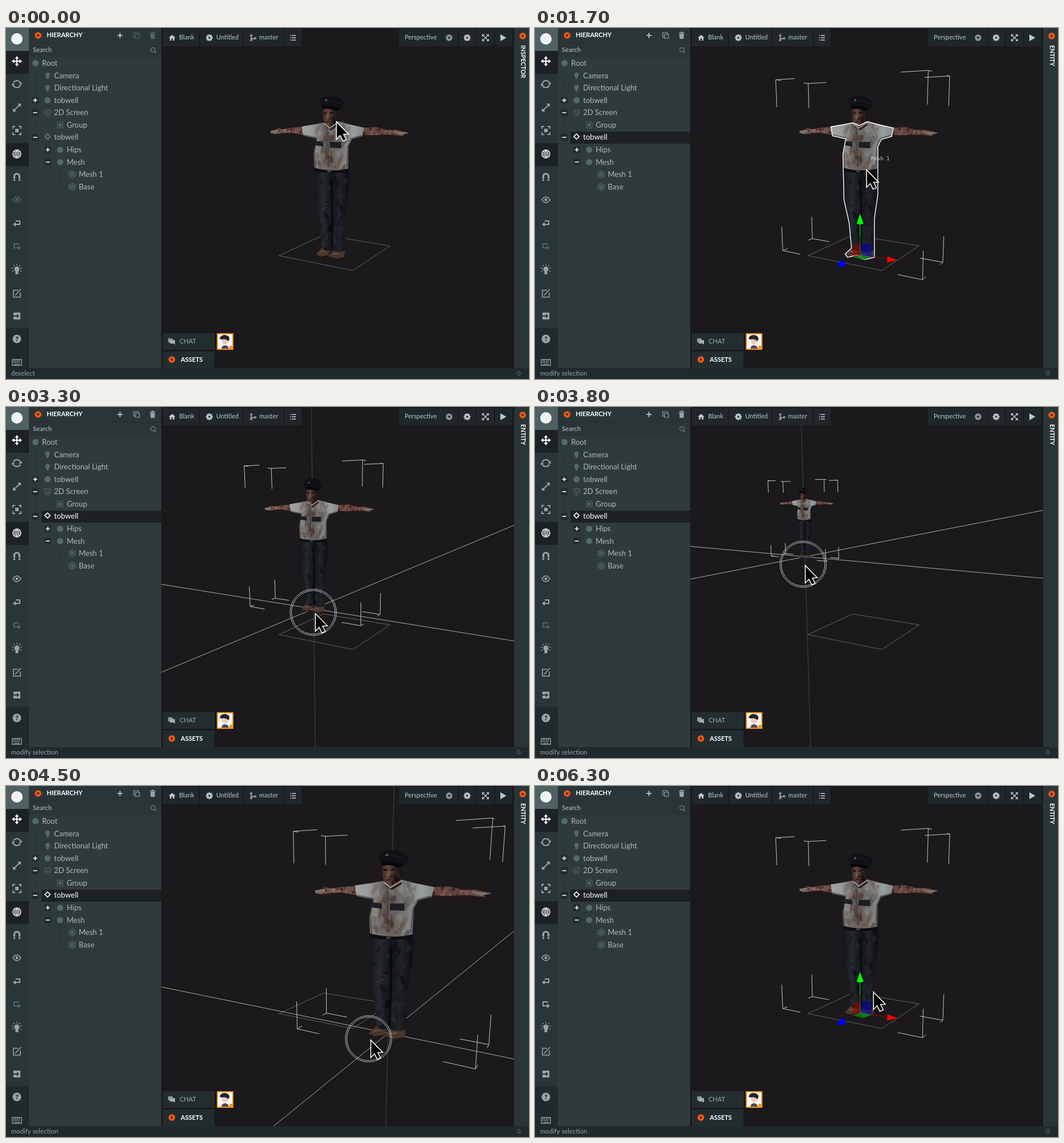
Animation, 913 px wide and 613 px high, one loop 6400 ms. Source, as an HTML page with a canvas:

```html
<!DOCTYPE html>
<html lang="en">
<head>
<meta charset="utf-8">
<title>Scene editor</title>
<style>
html, body { margin: 0; width: 100%; height: 100%; overflow: hidden; background: #1b191c; }
canvas { display: block; }
</style>
</head>
<body>
<canvas id="stage" width="913" height="613"></canvas>
<script>
const ctx = document.getElementById('stage').getContext('2d');
const LOOP = 6400, STEP = 100;
const SANS = 'Lato, "Open Sans", sans-serif';
const TEXT = '#b1b8ba', DIM = '#536568', WHITE = '#fff', ORANGE = '#ff5a0a', DARK = '#1b2124';

// ---------- drawing helpers ----------
function rect(x, y, w, h, color) { ctx.fillStyle = color; ctx.fillRect(x, y, w, h); }
function disc(x, y, r, color) {
  ctx.fillStyle = color;
  ctx.beginPath(); ctx.arc(x, y, r, 0, Math.PI * 2); ctx.fill();
}
function ring(x, y, r, color, width = 1) {
  ctx.strokeStyle = color; ctx.lineWidth = width;
  ctx.beginPath(); ctx.arc(x, y, r, 0, Math.PI * 2); ctx.stroke();
}
function line(a, b, color, width = 1) {
  ctx.strokeStyle = color; ctx.lineWidth = width;
  ctx.beginPath(); ctx.moveTo(...a); ctx.lineTo(...b); ctx.stroke();
}
function fill(d, color) { ctx.fillStyle = color; ctx.fill(new Path2D(d)); }
function stroke(d, color, width = 1) { ctx.strokeStyle = color; ctx.lineWidth = width; ctx.stroke(new Path2D(d)); }
function label(text, x, y, color, font) {
  ctx.font = font + ' ' + SANS; ctx.fillStyle = color; ctx.textBaseline = 'middle';
  ctx.fillText(text, x, y + 0.5);
}
function at(x, y, draw) { ctx.save(); ctx.translate(x, y); draw(); ctx.restore(); }

// ---------- camera: 45 degree lens, pitched down, turned against the world axes ----------
const CX = 579, CY = 297, FOCAL = 717, HORIZON = 157;
const PITCH = Math.atan((CY - HORIZON) / FOCAL), SIN = Math.sin(PITCH), COS = Math.cos(PITCH);
const YAW = 30.2 * Math.PI / 180, YS = Math.sin(YAW), YC = Math.cos(YAW);
const VANISH = [
  [CX - FOCAL / COS / Math.tan(YAW), HORIZON],
  [CX + FOCAL / COS * Math.tan(YAW), HORIZON],
  [CX, CY + FOCAL * COS / SIN]
];
function groundAt([x, y]) {
  const k = (y - CY) / FOCAL;
  const f = (COS - k * SIN) / (SIN + k * COS);
  return { r: (x - CX) / FOCAL * (f * COS + SIN), f };
}
function project(o, a, b, u) {
  const r = o.r - YC * a + YS * b, f = o.f + YS * a + YC * b, w = u - 1;
  const depth = f * COS - w * SIN;
  return [CX + FOCAL * r / depth, CY - FOCAL * (f * SIN + w * COS) / depth];
}
const HOME = [567, 394];

// ---------- timeline ----------
const SELECT = 200, SELECT_ROOT = 1700, DRAG = 3000, RELEASE = 5100, UNDO = 5800;
const CURSOR = [[900, 576, 162], [1400, 578, 246], [1900, 578, 246], [2400, 575, 364], [2600, 575, 364],
  [2900, 571, 398], [3000, 571, 398], [3800, 471, 275], [4500, 636, 442], [4900, 590, 358]];
const ORIGIN = [[3000, 567, 394], [3800, 471, 261], [4500, 666.4, 431.3], [4900, 581, 358]];
function track(keys, t) {
  if (t <= keys[0][0]) return keys[0].slice(1);
  for (let i = 1; i < keys.length; i++) {
    const [t0, x0, y0] = keys[i - 1], [t1, x1, y1] = keys[i];
    if (t < t1) {
      const p = (t - t0) / (t1 - t0), e = p * p * (3 - 2 * p);
      return [x0 + (x1 - x0) * e, y0 + (y1 - y0) * e];
    }
  }
  return keys[keys.length - 1].slice(1);
}

// ---------- figure ----------
const SHIRT = 'M516 172 L540 168 L555 165 L565 170 L580 163 L598 168 L625 174 L622 189 L604 194 L598 207 L597 246 Q570 254 539 246 L537 220 L542 193 L519 188 Z';
const PANTS = 'M539 247 Q570 254 597 248 L597 290 L592 332 L592 389 Q582 393 572 389 L570 330 L568 388 Q558 391 552 385 L548 340 L541 305 Z';
const ARM_L = 'M518 173 L500 174 L482 177 L474 174 L471 178 L461 180 L469 182 L464 185 L478 185 L497 183 L518 187 Z';
const ARM_R = 'M624 174 L646 173 L665 178 L682 178 L704 183 L690 184 L696 189 L678 187 L660 187 L640 188 L624 187 Z';
const FACE = 'M553 139 L580 140 L580 154 L576 166 L568 174 L559 170 L554 160 Z';
const HEAD_OUTLINE = 'M554 140 Q554 125 568 125 Q583 126 583 139 Q578 151 581 164 L571 181 Q563 191 559 191 Q555 184 558 172 Q553 160 554 140 Z';
const CLOTH_OUTLINE = SHIRT.replace('L597 246 Q570 254 539 246', 'L598 290 L592 332 L592 400 L575 404 L562 396 L545 400 L541 394 L552 384 L548 340 L539 300');

function speckle(shape, colors, seed, [x, y, w, h], count, size) {
  let s = seed;
  const rnd = () => (s = (s * 16807) % 2147483647) / 2147483647;
  rnd();
  ctx.save();
  ctx.clip(new Path2D(shape));
  for (let i = 0; i < count; i++) {
    ctx.fillStyle = colors[i % colors.length];
    ctx.beginPath();
    ctx.ellipse(x + rnd() * w, y + rnd() * h, size * (.4 + rnd()), size * (.6 + rnd() * 2), rnd() - .5, 0, 7);
    ctx.fill();
  }
  ctx.restore();
}
function shade(x0, x1, ...colors) {
  const g = ctx.createLinearGradient(x0, 0, x1, 0);
  colors.forEach((c, i) => g.addColorStop(i / (colors.length - 1), c));
  return g;
}
function basis(o) {
  const foot = project(o, 0, 0, 0), head = project(o, 0, 0, 1.157);
  const left = project(o, .57, 0, .9), right = project(o, -.57, 0, .9);
  return new DOMMatrix([right[0] - left[0], right[1] - left[1], head[0] - foot[0], head[1] - foot[1], ...foot]);
}
const HOME_INVERSE = basis(groundAt(HOME)).inverse();

function figure(o) {
  ctx.save();
  ctx.setTransform(basis(o).multiply(HOME_INVERSE));
  fill('M541 395 L551 384 L567 387 L562 397 L547 400 Z M562 398 L572 388 L592 388 L590 400 L577 404 Z', '#4b372d');
  stroke('M542 397 L549 400 L560 398 M564 400 L576 404 L589 401', '#1d1715', 2);
  stroke('M548 391 L558 390 M569 395 L580 394', '#77594a', 1.5);
  fill('M596 250 L600 252 L598 293 L594 288 Z', '#101114');
  fill(PANTS, shade(539, 597, '#15161b', '#252830', '#14151a', '#20232b', '#0e0f13'));
  speckle(PANTS, ['rgba(6,7,10,.4)', 'rgba(60,64,75,.2)', 'rgba(12,13,17,.3)'], 7701, [538, 250, 60, 140], 54, 3);
  stroke('M568 262 L570 330 L569 386', '#08090b', 2.5);
  stroke('M552 305 L563 308 M549 318 L560 313', '#3c3c3f');
  fill(ARM_L, '#6d4f48');
  speckle(ARM_L, ['rgba(50,18,18,.55)', 'rgba(165,140,128,.35)'], 9001, [462, 172, 56, 15], 22, 2);
  stroke('M478 185 L497 183 L518 187', '#2c1c1b', 1.5);
  fill(ARM_R, '#65443d');
  speckle(ARM_R, ['rgba(55,16,16,.6)', 'rgba(160,132,120,.35)'], 3101, [624, 172, 56, 17], 26, 2);
  stroke('M624 187 L640 188 L660 187 L678 187', '#2a1817', 1.5);
  fill('M461 180 L475 177 L476 182 L463 184 Z M671 180 L704 183 L690 187 Z', '#7d726c');
  fill(SHIRT, shade(516, 625, '#a0a4a2', '#999b98', '#706b67', '#65605d', '#7b7977', '#999e9d', '#82888a'));
  speckle(SHIRT, ['rgba(75,58,49,.25)', 'rgba(175,177,172,.18)', 'rgba(40,37,37,.22)'], 12301, [540, 170, 58, 76], 50, 3.5);
  speckle(SHIRT, ['rgba(70,42,35,.35)'], 5101, [549, 172, 20, 65], 14, 4);
  fill('M540 197 L554 199 L554 207 L540 205 Z M565 199 L585 199 L585 210 L565 209 Z', '#1d1e22');
  stroke('M561 175 L564 243', 'rgba(35,32,32,.6)');
  stroke('M519 187 L542 192 L538 220 L541 245 M621 188 L603 193 L597 207 L595 244', 'rgba(35,34,35,.5)', 2.5);
  fill('M538 244 Q570 253 598 245 L598 251 Q570 257 539 250 Z', '#0d0e11');
  rect(561, 249, 6, 3, '#45413d');
  fill('M557 165 L579 160 L580 170 L567 179 L558 172 Z', '#2b1e1d');
  fill(FACE, shade(553, 580, '#3d2a27', '#60433a', '#32221f', '#181415'));
  speckle(FACE, ['rgba(18,10,11,.5)', 'rgba(125,88,74,.28)'], 1801, [553, 143, 24, 28], 18, 2);
  stroke('M555 148 L560 149 M565 149 L572 147', '#100c0e', 2);
  stroke('M562 149 L561 157 L565 157', '#7e5a4c');
  stroke('M559 164 L566 163', '#1b1213', 1.3);
  stroke('M556 167 L565 175 L581 164', '#9b9d9a', 2);
  fill('M547 127 Q552 117 567 118 Q586 120 590 132 L583 143 Q568 136 552 139 Z', '#101114');
  stroke('M550 128 Q566 123 585 132', '#1f2024');
  fill('M551 137 Q566 133 582 141 L577 145 Q563 139 553 142 Z', '#060709');
  disc(559, 126, 2, '#5e523c');
  ctx.restore();
}

// ---------- scene ----------
const ROOT_BOX = [[-.6, .555], [-.232, .138], [0, 1.268]];
const HEAD_BOX = [[-.2, .16], [-.232, .138], [.728, 1.268]];
function brackets(o, box, far) {
  for (let i = 0; i < 8; i++) {
    const side = [i & 1, i >> 1 & 1, i >> 2];
    if ((side[0] + side[1] === 2) !== far) continue;
    const corner = side.map((s, k) => box[k][s]);
    for (let k = 0; k < 3; k++) {
      const end = corner.slice();
      end[k] += (box[k][1 - side[k]] - end[k]) * .15;
      line(project(o, ...corner), project(o, ...end), '#c4c4c4');
    }
  }
}
function gizmo([x, y], hover) {
  at(x - HOME[0], y - HOME[1], () => {
    fill('M555 379 L568 375 L568 397 L555 401 Z', 'rgba(170,0,0,.55)');
    fill('M569 374 L587 377 L587 400 L569 396 Z', 'rgba(0,0,180,.55)');
    fill('M555 400 L568 395 L588 399 L573 405 Z', hover === 'plane' ? 'rgba(255,255,255,.75)' : 'rgba(0,150,20,.7)');
    const up = hover === 'up' ? WHITE : '#0f0';
    line([567, 364], [567, 342], up);
    line([567, 364], [567, 394], '#158a19');
    fill('M567 324 L573 341 Q567 344 561 341 Z', up);
    ctx.setLineDash([2, 1]);
    line([591, 399], [615, 403.5], '#e00000');
    ctx.setLineDash([]);
    fill('M615 398 L632 405 L614 409 Z', '#f00');
    fill('M527 416 L533 405 L542 409 L540 417 Z', '#00f');
  });
}
function cursor([x, y]) {
  at(x + 1, y + 3, () => {
    const d = 'M0 0 L0 27 L6 21 L11 31 L15.5 29 L10.5 19.5 L18.5 19 Z';
    ctx.lineJoin = 'miter';
    stroke(d, WHITE, 3);
    fill(d, '#000');
  });
}
function scene(t) {
  ctx.save();
  ctx.beginPath(); ctx.rect(271, 0, 616, 594); ctx.clip();
  ctx.translate(.5, .5); // coordinates name pixel centres
  const spot = t < UNDO ? track(ORIGIN, t) : HOME, o = groundAt(spot);
  const dragging = t >= DRAG && t < RELEASE;
  const box = t < SELECT ? null : t < SELECT_ROOT ? HEAD_BOX : ROOT_BOX;
  const tip = track(CURSOR, t);
  stroke('M476 397 L554 361 L670 380 L605 423 Z', '#646365');
  if (dragging) VANISH.forEach((v, i) =>
    line(v, [2 * spot[0] - v[0], 2 * spot[1] - v[1]], i < 2 ? '#aaa' : '#454445'));
  if (box) brackets(o, box, true);
  figure(o);
  if (box) brackets(o, box, false);
  const hover = t >= 100 && t < 1100 ? 'Base' : t >= 1100 && t < 2100 ? 'Mesh 1' : '';
  if (hover) {
    stroke(hover === 'Base' ? HEAD_OUTLINE : CLOTH_OUTLINE, WHITE, 1.4);
    ctx.font = '9px "DejaVu Sans Mono", monospace';
    ctx.fillStyle = '#c9d0d3'; ctx.textBaseline = 'middle';
    ctx.fillText(hover, tip[0] + 8, tip[1] - 18);
  }
  if (box && !dragging) gizmo(spot, t >= 2300 && t < 2700 ? 'up' : t >= 2800 && t < DRAG ? 'plane' : '');
  if (dragging) for (const r of [38, 40.5]) ring(tip[0] - 3.5, tip[1] - 1, r, '#bdbdbd');
  cursor(tip);
  ctx.restore();
}

// ---------- interface ----------
const gear = (x, y, c) => {
  for (let i = 0; i < 8; i++) {
    const a = i * Math.PI / 4;
    line([x, y], [x + 6 * Math.cos(a), y + 6 * Math.sin(a)], c, 2.6);
  }
  ring(x, y, 3.4, c, 2.6);
  disc(x, y, 1.8, '#222a2d');
};
const badge = (x, y, d) => { disc(x, y, 5.7, ORANGE); at(x, y, () => fill(d, '#24292b')); };
const DOWN = 'M-3 -1.5 H3 L0 2.5 Z', RIGHT = 'M-1.5 -3 V3 L2.5 0 Z';
const COPY = 'M-5 -5 H3 V-2 M-5 -5 V3 H-2 M-2 -2 H5 V5 H-2 Z';
const HEX = 'M0 -6 L5.5 -3 V3 L0 6 L-5.5 3 V-3 Z M0 -3 L2.8 -1.5 V1.5 L0 3 L-2.8 1.5 V-1.5 Z';

function tools(t) {
  rect(0, 0, 40, 594, '#2a3538');
  rect(0, 524, 40, 70, '#20292b');
  rect(0, 0, 40, 40, '#506164');
  disc(19, 19, 10, '#f2f4f4');
  rect(0, 40, 40, 40, DARK);
  rect(0, 201, 40, 40, DARK);
  const c = '#9aa4a6';
  at(19, 58, () => {
    stroke('M-6 0 H6 M0 -6 V6', WHITE, 2);
    fill('M0 -9 L3.5 -4.5 H-3.5 Z M0 9 L3.5 4.5 H-3.5 Z M-9 0 L-4.5 -3.5 V3.5 Z M9 0 L4.5 -3.5 V3.5 Z', WHITE);
  });
  at(19, 98, () => {
    stroke('M-6 -2 A6.5 6.5 0 0 1 6 -2 M6 2 A6.5 6.5 0 0 1 -6 2', c, 2);
    fill('M8.5 -4 V1 H3.5 Z M-8.5 4 V-1 H-3.5 Z', c);
  });
  at(19, 139, () => { stroke('M-5 5 L5 -5', c, 2); fill('M1 -7 H7 V-1 Z M-7 1 V7 H-1 Z', c); });
  at(19, 179, () => {
    stroke('M-7 -3 V-7 H-3 M3 -7 H7 V-3 M7 3 V7 H3 M-3 7 H-7 V3', c, 1.8);
    rect(-3, -3, 6, 6, c);
  });
  at(19, 220, () => {
    ring(0, 0, 7, WHITE, 1.3);
    stroke('M-7 0 H7 M0 -7 V7 M-6 -3.5 H6 M-6 3.5 H6 M0 -7 Q-7 0 0 7 M0 -7 Q7 0 0 7', WHITE);
  });
  at(19, 260, () => {
    stroke('M-4.5 7 V-1 A4.5 4.5 0 0 1 4.5 -1 V7', c, 3.2);
    rect(-7, 3, 14, 1, '#2a3538');
  });
  const eye = t < SELECT ? DIM : c;
  at(19, 300, () => { stroke('M-7 0 Q0 -10 7 0 Q0 10 -7 0 Z', eye, 1.4); disc(0, 0, 2.4, eye); });
  at(19, 341, () => { stroke('M-3 2 H5 V-4 H-2', c, 2); fill('M-7 2 L-2 -2 V6 Z', c); });
  const redo = t >= UNDO ? c : DIM;
  at(19, 381, () => { stroke('M3 3 H-5 V-4 H4', redo, 2); fill('M7 3 L2 -1 V7 Z', redo); });
  at(19, 422, () => {
    disc(0, -1, 4.5, c); rect(-2.5, 3, 5, 5, c);
    for (let i = 0; i < 7; i++) {
      const a = Math.PI * (.85 + i * .217);
      line([6.5 * Math.cos(a), 6.5 * Math.sin(a) - 1], [9 * Math.cos(a), 9 * Math.sin(a) - 1], c, 1.3);
    }
  });
  at(19, 463, () => stroke('M2 -5 H-6 V7 H6 V-1 M-3 4 L7 -7', c, 1.6));
  at(19, 503, () => {
    rect(-6, -6, 12, 12, c);
    stroke('M-7 0 H1', '#2a3538', 2); fill('M0 -4 L4 0 L0 4 Z', '#2a3538');
  });
  disc(19, 543, 7.5, c);
  label('?', 16.2, 543, '#20292b', '900 12px');
  at(19, 584, () => {
    stroke('M-8 -5 H8 V5 H-8 Z', c, 1.3);
    ctx.setLineDash([2, 1]);
    stroke('M-6 -2.5 H6 M-6 0 H6 M-4 3 H4', c, 1.5);
    ctx.setLineDash([]);
  });
}

// name, text x, icon, expander
const ROWS = [['Root', 63, 'dot'], ['Camera', 84, 'bulb'], ['Directional Light', 84, 'bulb'], ['tobwell', 84, 'dot', '+'],
  ['2D Screen', 84, 'screen', '-'], ['Group', 106, 'group'], ['tobwell', 84, 'diamond', '-'],
  ['Hips', 106, 'dot', '+'], ['Mesh', 106, 'dot', '-'], ['Mesh 1', 127, 'mesh'], ['Base', 127, 'mesh']];
const ICONS = {
  dot: c => disc(0, 0, 5.4, c),
  bulb: c => { disc(0, -1.5, 3.9, c); fill('M-3 0 H3 L1.5 6 H-1.5 Z', c); },
  screen: c => stroke('M-5 -5 H5 V3 H-5 Z M-3 6 H3 M-3 -2 H0 M2 -2 H3 M-3 1 H3', c),
  group: c => { stroke('M-5 -5 H5 V5 H-5 Z', c); rect(-2.5, -2.5, 5, 5, c); },
  diamond: c => stroke('M0 -4.5 L4.5 0 L0 4.5 L-4.5 0 Z', c, 1.7),
  mesh: c => { stroke(HEX, c, 1.1); disc(0, 0, 1.4, c); }
};
function hierarchy(t) {
  rect(40, 0, 231, 594, '#2f3a3d');
  rect(40, 0, 231, 51, '#2a3538');
  rect(40, 26, 231, 1, '#242e31');
  badge(56, 13, DOWN);
  label('HIERARCHY', 71, 12.5, WHITE, 'bold 11px');
  const c = t < SELECT ? DIM : '#9aa4a6';
  stroke('M194.5 13 H203.5 M199 8.5 V17.5', TEXT, 2);
  at(228, 13, () => stroke(COPY, c, 1.2));
  at(256, 13, () => { fill('M-4 -3 H4 L3.5 6 H-3.5 Z M-5 -5 H5 V-3.7 H-5 Z M-2 -6.5 H2 V-5 H-2 Z', c); });
  label('Search', 47, 38.5, '#9ba3a5', 'bold 11px');
  ring(256.5, 38, 3.7, '#788487', 1.2);
  line([259, 41], [262, 44], '#788487', 1.5);

  stroke('M51.5 72 V190 M51.5 83 H66 M51.5 104.5 H66 M73.5 155 V169 H87 M73.5 198 V234 M94.5 241 V277 M94.5 255.5 H109 M94.5 277 H109', '#273235');
  const selected = t < SELECT ? -1 : t < SELECT_ROOT ? 10 : 6;
  ROWS.forEach(([name, x, icon, sign], i) => {
    const y = 61.5 + i * 21.58, active = i === selected;
    if (active) rect(x - 22, Math.round(y - 10), 293 - x, 21, DARK);
    const side = icon === 'mesh' ? '#5b6f70' : '#526b69';
    at(x - 11.5, y - (icon === 'diamond' ? 1.5 : 0), () => ICONS[icon](active ? WHITE : icon === 'diamond' ? '#6b8081' : side));
    label(name, x, y, active ? WHITE : TEXT, '13px');
    if (sign) at(x - 33, y, () => {
      rect(-6, -6, 12, 12, '#222c2e');
      stroke('M-3.5 0 H3.5' + (sign === '+' ? ' M0 -3.5 V3.5' : ''), '#dfe3e3', 1.8);
    });
  });
}
function toolbar() {
  for (const [x, w] of [[274, 63], [339, 74], [415, 70], [487, 29], [686, 103], [791, 29], [822, 30], [854, 30]])
    rect(x, 2, w, 30, '#20272a');
  const c = '#c0c6c7';
  at(290, 17, () => fill('M0 -5 L6 0 H4 V5 H1.3 V1.5 H-1.3 V5 H-4 V0 H-6 Z', c));
  label('Blank', 302, 16.5, c, '11px');
  gear(355, 17, c);
  label('Untitled', 367, 16.5, c, '11px');
  at(431, 17, () => {
    stroke('M-3 -3 V3 M-3 0 Q0 3 3 1', c, 1.2);
    for (const [x, y] of [[-3, -4], [-3, 4], [4, 1]]) ring(x, y, 1.5, c, 1.2);
  });
  label('master', 442, 16.5, c, '11px');
  for (const y of [13, 17, 21]) { rect(496, y - .7, 1.6, 1.6, c); rect(499, y - .7, 7, 1.6, c); }
  label('Perspective', 696, 16.5, c, '11px');
  disc(773.5, 17, 5.7, '#8c9496');
  at(773.5, 17, () => fill(DOWN, '#20272a'));
  gear(805, 17, c);
  at(837, 17, () => {
    stroke('M-4 -4 L4 4 M4 -4 L-4 4', c, 1.3);
    fill('M-6 -6 H-1.5 L-6 -1.5 Z M6 -6 V-1.5 L1.5 -6 Z M6 6 H1.5 L6 1.5 Z M-6 6 V1.5 L-1.5 6 Z', c);
  });
  fill('M863 11 L873.5 17 L863 23 Z', c);
}
function dock() {
  rect(274, 533, 90, 29, '#232d30');
  rect(274, 565, 90, 29, '#232d30');
  rect(283, 542, 8, 7, '#8c9799');
  fill('M286 545 H295 V553 L292 551 H286 Z', '#a4adaf');
  label('CHAT', 303, 547.5, '#a4adaf', '11px');
  badge(289.5, 579, RIGHT);
  label('ASSETS', 305, 579, WHITE, 'bold 11px');
  rect(368, 533, 29, 29, '#f7931e');
  rect(370, 535, 25, 25, '#fbfafa');
  fill('M377 543 H388 V549 Q382 556 377 549 Z', '#eccabb');
  fill('M373 543 Q374 536 382 536 Q391 537 390 544 L388 547 Q384 542 376 544 Z', '#25252a');
  fill('M376 560 Q377 554 382 554 Q388 554 389 560 Z', '#4b4a55');
  rect(390, 555, 7, 7, '#f7931e');
}
function chrome(t) {
  rect(887, 0, 26, 594, '#2a3538');
  badge(902, 14, RIGHT);
  at(902, 30, () => {
    ctx.rotate(Math.PI / 2);
    label(t < SELECT ? 'INSPECTOR' : 'ENTITY', 0, -.5, WHITE, 'bold 10.5px');
  });
  rect(0, 594, 913, 19, '#20292b');
  const status = t < SELECT ? 'deselect' : t >= RELEASE && t < UNDO ? 'entities.translate' : 'modify selection';
  label(status, 9, 603.5, '#9ba3a5', '11.3px');
  label('0', 892, 603.5, '#667679', '11px');
}

function frame(now) {
  const t = Math.floor(now % LOOP / STEP) * STEP;
  rect(0, 0, 913, 613, '#1b191c');
  scene(t);
  toolbar();
  dock();
  tools(t);
  hierarchy(t);
  chrome(t);
  requestAnimationFrame(frame);
}
frame(0);
</script>
</body>
</html>
```
